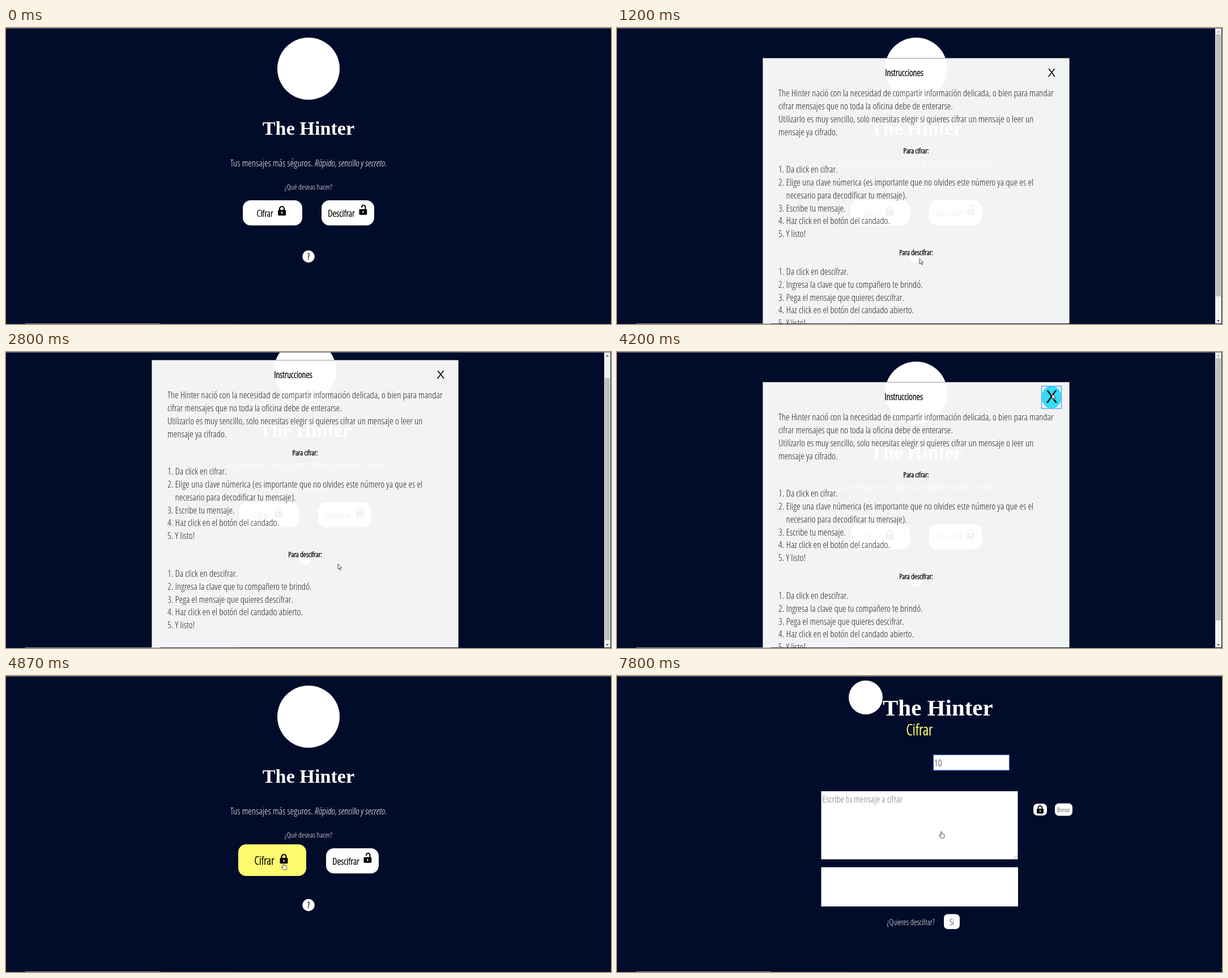
An HTML page for the animation above (8 s loop, 1068 by 524 pixels).

```html
<!DOCTYPE html>
<html lang="es">
<head>
<meta charset="utf-8">
<style>
html, body { margin: 0; width: 100%; height: 100%; overflow: hidden; background: #000c29; }
svg { display: block; }
text { font: 300 17px "Open Sans Condensed Light", "Open Sans", sans-serif; font-stretch: 75%; fill: #fff; white-space: pre; }
.mid { text-anchor: middle; }
.serif { font-family: "Liberation Serif", serif; font-weight: 700; font-stretch: normal; }
.sans { font-family: "Liberation Sans", sans-serif; font-weight: 400; font-stretch: normal; }
.dark { fill: #222; }
.black { fill: #000; }
.gray { fill: #757575; }
.bold { stroke: #000; stroke-width: .5px; }
.yellow { fill: #fffb70; stroke: #fffb70; stroke-width: .6px; }
</style>
</head>
<body>
<svg id="stage" width="1068" height="524" viewBox="0 0 1068 524"></svg>
<script>
const text = (x, y, size, str, cls = '', id = '') =>
  `<text id="${id}" x="${x}" y="${y}" class="${cls}" style="font-size:${size}px">${str}</text>`;
const box = (x, y, w, h, r = 0, fill = '#fff', id = '') =>
  `<rect id="${id}" x="${x}" y="${y}" width="${w}" height="${h}" rx="${r}" fill="${fill}"/>`;
const put = (name, x, y, k = 1) => `<use href="#${name}" transform="translate(${x} ${y}) scale(${k})"/>`;
const lines = (y, rows, x = 285) => rows.map((s, i) => text(x, y + i * 22.85, 16.8, s, 'dark')).join('');
const steps = (y, rows) => lines(y, rows.map(r => r[0])) + lines(y, rows.map(r => r[1]), 298.5);

const lockBody = 'M1.5 7h11q1.5 0 1.5 1.5v7q0 1.5-1.5 1.5h-11q-1.5 0-1.5-1.5v-7q0-1.5 1.5-1.5zM6 10v3.5h2v-3.5z';
const lock = (id, shackle) => `<g id="${id}"><path fill-rule="evenodd" d="${lockBody}"/>
  <path fill="none" stroke="#000" stroke-width="2.2" d="${shackle}"/></g>`;

const defs = `<defs>
  ${lock('lock', 'M3 8V5a4 4 0 0 1 8 0v3')}
  ${lock('unlock', 'M4.5 4V3a3.3 3.3 0 0 1 6.6 0v5')}
  <path id="arrow" d="M0 0V9.5L2.2 7.6 3.7 11 5.2 10.4 3.8 7.1H6.6z" fill="#fff" stroke="#222" stroke-width=".8"/>
  <path id="hand" d="M-1 1Q0-.6 1 1V4.2L4.5 5Q6 5.4 5.8 7L5 11.8H-.8L-3.6 7.6Q-3.8 6-2.4 6.6L-1 7.8z" fill="#fff" stroke="#222" stroke-width=".8"/>
  <path id="beam" d="M-2-5H2M0-5V5M-2 5H2" fill="none" stroke="#8a90a0" stroke-width=".8"/>
</defs>`;

const home = `<g id="home">
  <circle cx="534" cy="72" r="55" fill="#fff"/>
  ${text(534, 189, 34.2, 'The Hinter', 'serif mid')}
  ${text(534, 244.5, 16.8, 'Tus mensajes más seguros. <tspan font-style="italic">Rápido, sencillo y secreto.</tspan>', 'mid')}
  ${text(534, 286, 13.4, '¿Qué deseas hacer?', 'mid')}
  <g id="cipher">${box(418, 305, 105, 44.5, 14)}${text(457, 334, 16.8, 'Cifrar', 'black mid bold')}${put('lock', 480, 315)}</g>
  <g id="cipherHot">${box(410, 298, 120, 56, 14, '#fffb70')}${text(456, 334, 20.2, 'Cifrar', 'black mid bold')}${put('lock', 483.5, 315)}</g>
  <g id="decipher">${box(557, 305, 93, 44.5, 14)}${text(592, 334, 16.8, 'Descifrar', 'black mid bold')}${put('unlock', 623.5, 314, .98)}</g>
  <g id="help"><circle id="helpDot" cx="534" cy="404.5" r="10.7" fill="#fff"/>${text(534, 410, 14, '?', 'black mid bold')}</g>
</g>`;

const modal = `<g id="modal"><g id="sheet">
  <rect x="257.5" y="53.5" width="541" height="560" fill="rgba(255,255,255,.95)" stroke="#999"/>
  ${text(507, 84.5, 16, 'Instrucciones', 'black mid bold', 'heading')}
  <g id="closeHot"><ellipse cx="767" cy="80" rx="17.5" ry="20" fill="#33dcfb"/>
    <rect id="ring" x="749.5" y="60.5" width="35" height="39.5" fill="none" stroke="#5b9df5" stroke-width="1.4"/></g>
  ${text(767.3, 86, 21, 'X', 'black sans mid', 'close')}
  ${lines(121, [
    'The Hinter nació con la necesidad de compartir información delicada, o bien para mandar',
    'cifrar mensajes que no toda la oficina debe de enterarse.',
    'Utilizarlo es muy sencillo, solo necesitas elegir si quieres cifrar un mensaje o leer un',
    'mensaje ya cifrado.'])}
  ${text(528, 221.5, 13, 'Para cifrar:', 'black mid bold')}
  ${steps(256, [['1.', 'Da click en cifrar.'],
    ['2.', 'Elige una clave númerica (es importante que no olvides este número ya que es el'],
    ['', 'necesario para decodificar tu mensaje).'],
    ['3.', 'Escribe tu mensaje.'], ['4.', 'Haz click en el botón del candado.'], ['5.', 'Y listo!']])}
  ${text(528, 402, 13, 'Para descifrar:', 'black mid bold')}
  ${steps(436.8, [['1.', 'Da click en descifrar.'], ['2.', 'Ingresa la clave que tu compañero te brindó.'],
    ['3.', 'Pega el mensaje que quieres descifrar.'],
    ['4.', 'Haz click en el botón del candado abierto.'], ['5.', 'Y listo!']])}
  </g>
  ${box(1056, 1, 11, 522, 0, '#f1f1f1')}${box(1057, 11, 9, 464, 0, '#c1c1c1', 'thumb')}
  <path id="up" d="M1059 8l2.5-3 2.5 3z"/><path d="M1059 517l2.5 3 2.5-3z" fill="#505050"/>
</g>`;

const form = `<g id="form">
  <circle cx="439" cy="38" r="30" fill="#fff"/>
  ${text(469, 69.5, 41, 'The Hinter', 'serif')}
  ${text(534, 105, 27, 'Cifrar', 'mid yellow')}
  ${box(558, 139.5, 134.5, 27.5)}
  <rect id="focus" x="558.5" y="139.5" width="134" height="27.5" fill="none" stroke="#2a5fc4" stroke-width="1.2"/>
  ${text(560, 160, 16.8, '', '', 'key')}${box(560.5, 144, .9, 19, 0, '#222', 'caret')}
  ${box(360.5, 204, 347, 120.5)}${text(362.5, 224, 16.8, 'Escribe tu mensaje a cifrar', 'gray')}
  <path d="M700 323l6-6M703 323l3-3" stroke="#888" stroke-width=".8"/>
  ${box(360.5, 338.5, 347.5, 69.5)}
  ${box(735, 226, 24, 21, 7)}${put('lock', 741, 229, .85)}
  ${box(773, 225.5, 31, 22, 7)}${text(788, 241, 11, 'Borrar', 'dark mid')}
  ${text(476.5, 440.5, 14, '¿Quieres descifrar?')}
  ${box(577, 421.5, 28, 26.5, 7)}${text(591, 440.5, 14, 'Si', 'dark mid')}
</g>`;

const edges = box(0, 0, 1068, 1, 0, '#6d7280') + box(0, 523, 1068, 1, 0, '#06102a')
  + box(34, 523, 238, 1, 0, '#9a9ca5') + box(272, 523, 139, 1, 0, '#20283c');

const $ = id => document.getElementById(id);
$('stage').innerHTML = defs + home + modal + form + edges + '<use id="cursor"/>';

const cursorPath = [
  [0, 506, 236, 'beam'], [200, 494, 262, 'arrow'], [270, 482, 305, 'hand'], [330, 478, 328, 'hand'],
  [470, 486, 344, 'hand'], [530, 503, 362, 'arrow'], [600, 518, 382, 'arrow'], [670, 530, 399, 'hand'],
  [800, 533, 405, 'hand'], [930, 534, 408, 'hand'], [1200, 534, 408, 'arrow'],
  [1730, 546, 398, 'arrow'], [1800, 570, 384, 'arrow'], [1930, 586, 375, 'arrow'],
  [3200, 690, 240, 'arrow'], [3330, 752, 159, 'arrow'], [3470, 754, 122, 'arrow'], [3600, 757, 88, 'arrow'],
  [3730, 758, 74, 'arrow'], [3870, 763, 74, 'arrow'], [3930, 768, 74, 'arrow'],
  [4330, 717, 119, 'arrow'], [4470, 620, 220, 'arrow'], [4600, 528, 300, 'hand'], [4730, 490, 333, 'hand'],
  [4870, 490, 331, 'hand'], [5200, 560, 262, 'arrow'], [5330, 628, 197, 'hand'], [5470, 632, 187, 'hand'],
  [5600, 637, 174, 'hand'], [5730, 641.5, 166, 'hand'], [6000, 643, 163, 'hand'], [6130, 644, 160.5, 'hand'],
  [6400, 644, 160.5, 'beam'], [7600, 622, 212, 'hand'], [7730, 586, 258, 'hand'], [7800, 572.5, 275, 'hand']];
const scrolls = [[0, 0], [2270, 28], [2330, 43], [2800, 39], [2930, 0]];
const keys = [[0, 'Elige tu clave'], [6930, '1'], [7130, '10']];

const at = (list, t) => list.findLast(k => k[0] <= t);
const show = (id, on) => $(id).setAttribute('display', on ? 'inline' : 'none');
const move = (id, x, y) => $(id).setAttribute('transform', `translate(${x} ${y})`);
const set = (id, attrs) => { for (const a in attrs) $(id).setAttribute(a, attrs[a]); };

function draw(now) {
  const t = now % 8000, within = (a, b) => t >= a && t < b;
  const open = within(1200, 4330), hot = within(270, 530) || within(4600, 5070);
  const helpHot = within(670, 1200), closeHot = within(3600, 4330), scroll = at(scrolls, t)[1];

  show('home', t < 5070);
  move('home', open ? -6 : 0, -scroll);
  show('cipher', !hot);
  show('cipherHot', hot);
  move('decipher', hot ? 8 : 0, 0);
  move('help', 0, helpHot ? 3 : hot ? 1 : 0);
  set('helpDot', { r: helpHot ? 14 : 10.7, fill: helpHot ? '#33dcfb' : '#fff' });

  show('modal', open);
  move('sheet', 0, -scroll);
  move('heading', closeHot ? -.7 : 0, 0);
  show('closeHot', closeHot);
  show('ring', t >= 4200);
  set('close', { y: closeHot ? 90 : 86 });
  $('close').style.fontSize = closeHot ? '31px' : '21px';
  set('thumb', { y: 11 + scroll * .9 });
  set('up', { fill: scroll ? '#505050' : '#a3a3a3' });

  show('form', t >= 5070);
  const typed = at(keys, t)[1], typing = t >= 6930;
  $('key').textContent = typed;
  set('key', { class: typing ? 'dark' : 'gray' });
  show('focus', t >= 6400);
  show('caret', within(6400, 7600));
  set('caret', { x: 560.5 + (typing ? typed.length * 6.8 : 0) });

  const [, x, y, shape] = at(cursorPath, t);
  set('cursor', { href: '#' + shape });
  move('cursor', x, y);
}

const start = performance.now();
(function loop() {
  draw(performance.now() - start);
  requestAnimationFrame(loop);
})();
</script>
</body>
</html>
```
